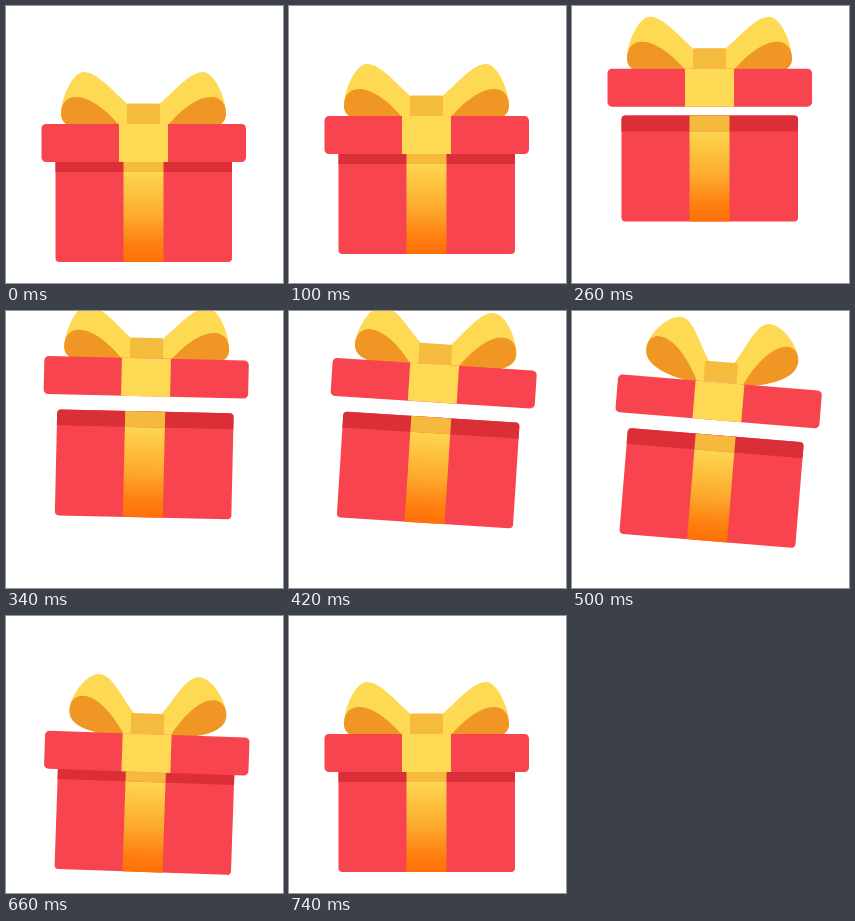
Animation, 277 px wide and 277 px high, one loop 0.94 s. Source, as an HTML page:

```html
<!DOCTYPE html>
<html lang="en">
<head>
<meta charset="utf-8">
<title>Gift box</title>
<style>
  html, body { margin: 0; width: 100%; height: 100%; overflow: hidden; background: #fff; }
  svg { display: block; width: 100vw; height: 100vh; }
</style>
</head>
<body>
<svg viewBox="0 0 277 277">
  <defs>
    <linearGradient id="ribbon" x1="0" y1="0" x2="0" y2="1">
      <stop offset="0" stop-color="#fed650"/>
      <stop offset=".5" stop-color="#fda92d"/>
      <stop offset=".82" stop-color="#ff7e10"/>
      <stop offset="1" stop-color="#ff7008"/>
    </linearGradient>
    <g id="loop">
      <path id="outer" fill="#fed953"/>
      <path id="inner" fill="#f09624"/>
    </g>
  </defs>
  <g id="gift">
    <rect x="49.5" y="150" width="176.5" height="106" rx="4" fill="#f8444f"/>
    <path d="M49.5 166V154q0-4 4-4H222q4 0 4 4v12z" fill="#db2f37"/>
    <path d="M117.5 150h40v16h-40z" fill="#f5b93d"/>
    <path d="M117.5 166h40v90h-40z" fill="url(#ribbon)"/>
    <g id="lid">
      <use href="#loop"/>
      <use href="#loop" transform="translate(275 0) scale(-1 1)"/>
      <path d="M121 118V99q0-1.5 1.5-1.5h30q1.5 0 1.5 1.5v19z" fill="#f5bb3c"/>
      <rect x="35.5" y="118" width="204.5" height="38" rx="4.5" fill="#f8444f"/>
      <path d="M113 118h49v38h-49z" fill="#fed953"/>
    </g>
  </g>
</svg>
<script>
const LOOP = 940, STEP = 20;
const $ = id => document.getElementById(id);

// Bow loop outlines: relaxed and squeezed upright
const outer = ["M123 122C95 124 55 128 55 108C55 93 66 66 78 66C92 66 108 87 125 101",
               "M123 120C95 116 63 106 63 86C63 72 83 53 97 53C110 53 114 78 127 100"];
const inner = ["M114 122C95 124 55 128 55 108C55 97 61 91 70 91C84 91 100 104 113 119",
               "M114 120C95 116 63 106 63 86C63 79 67 73 74 73C88 73 104 93 115 119"];

function ease(t, from, to) {
  const u = Math.min(1, Math.max(0, (t - from) / (to - from)));
  return u * u * (3 - 2 * u);
}

// Rises from 0 to 1 during a..b and returns during c..d
const pulse = (t, a, b, c, d) => ease(t, a, b) - ease(t, c, d);

function morph([from, to], k) {
  const end = to.match(/\d+/g);
  let i = 0;
  return from.replace(/\d+/g, n => (+n + (end[i++] - n) * k).toFixed(2));
}

function draw(t) {
  const lift = 50 * pulse(t, 14, 356, 356, 653);
  const gap = 21 * pulse(t, 115, 340, 495, 615);
  const tilt = 4.7 * pulse(t, 260, 490, 560, 740);
  const squeeze = pulse(t, 360, 560, 580, 740);
  $("gift").setAttribute("transform", `translate(0 ${-lift}) rotate(${tilt} 137.5 225)`);
  $("lid").setAttribute("transform", `translate(0 ${-gap})`);
  $("outer").setAttribute("d", morph(outer, squeeze));
  $("inner").setAttribute("d", morph(inner, squeeze));
}

function frame() {
  const t = performance.now() % LOOP;
  draw(Math.floor(t / STEP) * STEP);
  requestAnimationFrame(frame);
}
frame();
</script>
</body>
</html>
```
